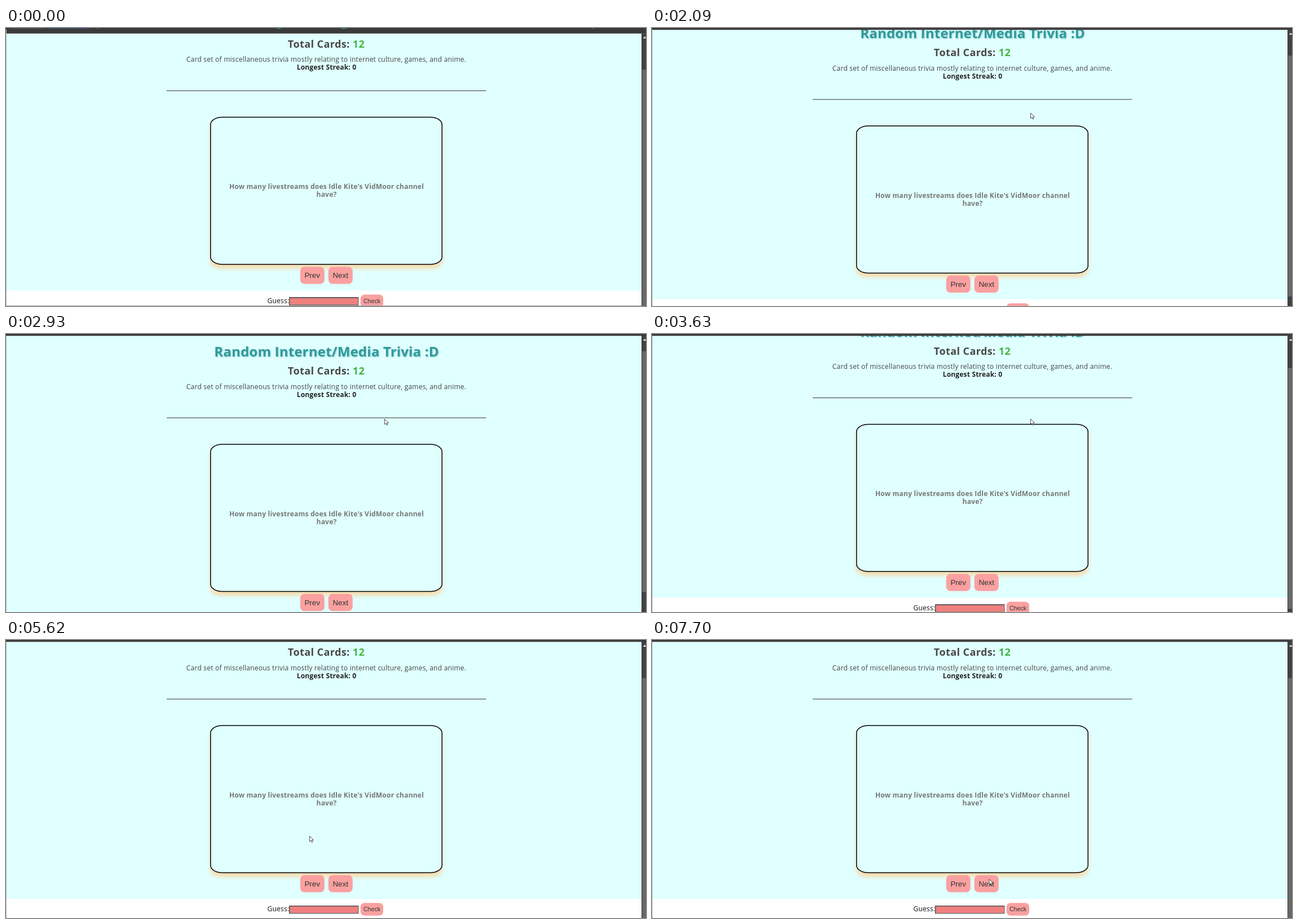
These frames come from a looping animation (1135 px wide and 494 px high, 8000 ms). An HTML page:

```html
<!DOCTYPE html>
<html lang="en">
<head>
<meta charset="utf-8">
<title>Trivia cards</title>
<style>
  html, body { margin: 0; height: 100%; overflow: hidden; background: #fff; }
  svg { display: block; width: 100vw; height: 100vh; }
  text { font: 12px "Open Sans", "Noto Sans", sans-serif; letter-spacing: .23px; text-anchor: middle; fill: #444; }
  .bold { font-weight: 700; letter-spacing: .18px; }
  .title { font-size: 24px; fill: #2f9a9a; filter: drop-shadow(1px 1px 1px #8bc4cc); }
  .total { font-size: 18px; letter-spacing: .42px; fill: #484848; }
  .total tspan { fill: #44b544; }
  .streak { fill: #222; }
  .question { fill: #777; letter-spacing: .22px; }
  .guess { text-anchor: start; fill: #111; }
  .button rect { fill: #faa0a0; }
  .button text { font: 13.33px "Liberation Sans", Arial, sans-serif; letter-spacing: 0; fill: #333; }
  .button .small { font-size: 10.67px; }
</style>
</head>
<body>
<svg viewBox="0 0 1135 494" preserveAspectRatio="none">
  <defs>
    <filter id="blur" x="-10%" y="-10%" width="120%" height="120%"><feGaussianBlur stdDeviation="3.6"/></filter>
  </defs>

  <g id="win">
    <rect x="1" y="3" width="1126" height="520" fill="#fff"/>
    <g id="page">
      <rect x="1" y="-100" width="1126" height="560" fill="#e0ffff"/>
      <text class="bold title" x="568.5" y="-4">Random Internet/Media Trivia :D</text>
      <text class="bold total" x="568" y="28">Total Cards: <tspan>12</tspan></text>
      <text x="568" y="53.5">Card set of miscellaneous trivia mostly relating to internet culture, games, and anime.</text>
      <text class="bold streak" x="568.5" y="67.7">Longest Streak: 0</text>
      <rect x="285" y="104.4" width="566.5" height="1.1" fill="#444"/>

      <rect x="362" y="158" width="412" height="263" rx="20.6" ry="13.2" fill="#f5dcae" filter="url(#blur)"/>
      <rect x="362.75" y="151.9" width="410.5" height="261.6" rx="20.6" ry="13.2" fill="#e0ffff" stroke="#000" stroke-width="1.5"/>
      <g id="front">
        <text class="bold question" x="568.5" y="279.7">How many livestreams does Idle Kite's VidMoor channel</text>
        <text class="bold question" x="568.5" y="293.8">have?</text>
      </g>
      <text id="back" class="bold question" x="568.5" y="286.7">2</text>

      <g class="button">
        <rect x="521.7" y="417.8" width="43" height="30.4" rx="7.5"/>
        <text x="543.2" y="437.6">Prev</text>
        <rect x="571.7" y="417.8" width="43" height="30.4" rx="7.5"/>
        <text x="593.2" y="437.6">Next</text>
        <rect x="628.7" y="467.2" width="40.3" height="22.6" rx="7"/>
        <text class="small" x="649" y="482.2">Check</text>
      </g>
      <text class="guess" x="463.5" y="482">Guess:</text>
      <rect x="502" y="472" width="123.5" height="14.5" fill="#777"/>
      <path d="M502 486.5V472H625.5L624 473.5H503.5V485z" fill="#484848"/>
      <rect x="503.5" y="473.5" width="120.5" height="11.5" fill="#f08080"/>
    </g>

    <rect x="1127" y="3" width="8" height="520" fill="#424242"/>
    <rect id="thumb" x="1128" y="67.5" width="7" height="428" fill="#686868"/>
    <path d="M1129.5 12L1132.7 8.5L1136 12z" fill="#ddd"/>

    <rect y="-20" width="1135" height="23.3" fill="#3b3a3a"/>
    <rect x="8" y="-12" width="59" height="7.5" fill="#484848"/>
    <rect x="75" y="-12" width="74" height="7.5" fill="#3a4560"/>
    <path d="M480 -7q4 3 8 0M595 -7q4 3 8 0M161 -6h3M1040 -6h3" fill="none" stroke="#2a9c4c" stroke-width="1.6"/>
  </g>

  <rect y="3" width="1" height="491" fill="#b5bcbc"/>
  <rect id="edge" y="493" width="1127" height="1" fill="#aaa"/>
  <path id="cursor" d="M0 0V9.6L2.3 7.6L3.9 11L5.4 10.3L3.9 7H6.9z" fill="#fff" stroke="#222" stroke-width=".8"/>
</svg>

<script>
const LOOP = 8000;
const $ = id => document.getElementById(id);

// Each track holds [start time, ...values] until the next entry.
const windowDrop = [[0, 6.5], [140, 3], [280, 0]];
const scroll = [
  [0, 0], [1820, 6], [1960, 15], [2090, 22], [2230, 26], [2380, 30], [2520, 34],
  [2650, 38], [2790, 42], [2930, 44],
  [3360, 36], [3490, 20], [3630, 8.5], [3770, 3], [3910, 0]
];
const pointer = [
  [0, -50, -50], [700, 645, 32], [835, 662, 105], [970, 671.5, 151],
  [4620, 675, 230], [4770, 598, 427], [4910, 579.5, 424.5],
  [5180, 562, 408], [5330, 538, 384], [5470, 529, 360], [5620, 538.5, 348.5],
  [7040, 556, 385], [7170, 584, 440], [7310, 592, 457],
  [7580, 596, 440], [7700, 598, 425]
];
const flipped = [[0, false], [6330, true], [6900, false]];

const at = (track, t) => track.findLast(key => key[0] <= t).slice(1);
const move = (id, x, y) => $(id).setAttribute("transform", `translate(${x} ${y})`);
const show = (id, on) => $(id).setAttribute("visibility", on ? "visible" : "hidden");

function draw(now) {
  const t = now % LOOP;
  const [drop] = at(windowDrop, t);
  const [offset] = at(scroll, t);
  const [answer] = at(flipped, t);
  move("win", 0, drop);
  move("page", 0, offset);
  move("thumb", 0, -offset * .84);
  move("cursor", ...at(pointer, t));
  show("edge", drop > 0);
  show("front", !answer);
  show("back", answer);
  requestAnimationFrame(draw);
}
draw(performance.now());
</script>
</body>
</html>
```
